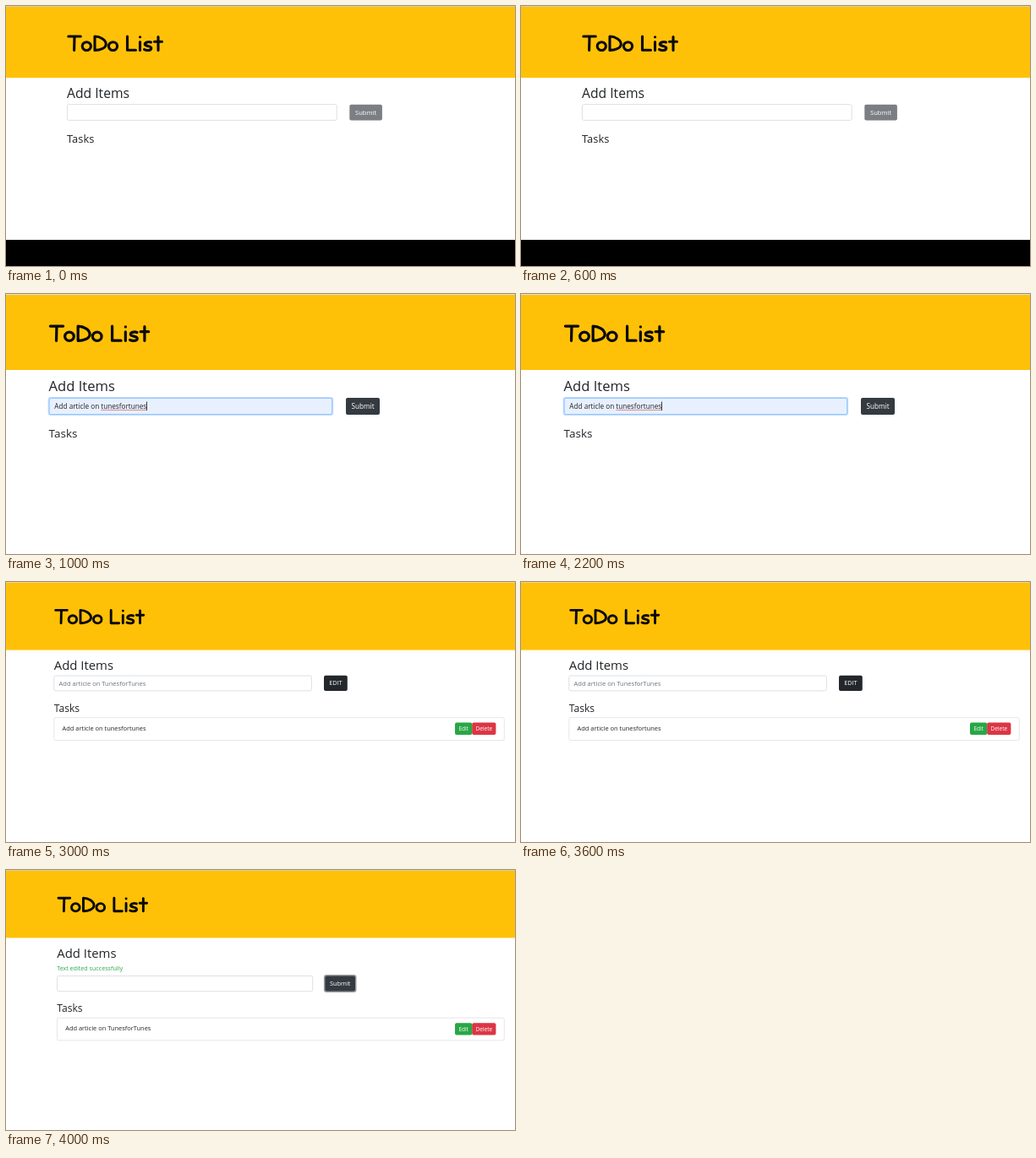
An HTML page that plays this animation: 602x308 px, repeating every 5 s.

```html
<!DOCTYPE html>
<html lang="en">
<head>
<meta charset="utf-8">
<title>ToDo List</title>
<style>
  html, body { margin: 0; width: 100%; height: 100%; overflow: hidden; background: #fff; }
  svg { display: block; width: 602px; height: 308px; font-family: "Open Sans", "Noto Sans", sans-serif; }
  .title path { fill: none; stroke: #0a0a05; stroke-width: 3.1; stroke-linecap: round; stroke-linejoin: round; }
</style>
</head>
<body>
<svg id="stage" viewBox="0 0 602 308"></svg>
<script>
const LOOP = 5000;
const INK = '#212529', DARK = '#343a40', GREEN = '#28a745', RED = '#dc3545';

const rect = (x, y, w, h, fill, extra = '') =>
  `<rect x="${x}" y="${y}" width="${w}" height="${h}" fill="${fill}" ${extra}/>`;
const text = (x, y, size, str, fill = INK, extra = '') =>
  `<text x="${x}" y="${y}" font-size="${size}" fill="${fill}" ${extra}>${str}</text>`;
const heading = (x, y, size, str) => text(x, y, size, str, INK, 'font-weight="500"');
const box = (x, y, w, h, stroke = '#d5d9dd', fill = '#fff') =>
  rect(x, y, w, h, fill, `rx="2" stroke="${stroke}" stroke-width=".8"`);
const button = (x, y, w, h, fill, size, label) =>
  rect(x, y, w, h, fill, 'rx="2"') +
  text(x + w / 2, y + h / 2 + size * .36, size, label, '#fff', 'text-anchor="middle"');

// Hand-lettered title, baseline at y = 0
const lettering = [
  'M1.8-18H16.3M9-18L8.6-1.6',
  'M28.4-6.4A5.1 4.9 0 1 1 18.2-6.4A5.1 4.9 0 1 1 28.4-6.4',
  'M33-18V-1.6C39-1.6 46-4 46.3-8.5C46.5-14 39-18 33-18',
  'M59.6-6.4A5.1 4.9 0 1 1 49.4-6.4A5.1 4.9 0 1 1 59.6-6.4',
  'M71.5-18V-1.7H81.5',
  'M86.5-11.5V-1.6M86.5-17.2h.1',
  'M99.5-11C96-12.5 92-10.5 92.3-8.5C93-6 100-7 99.8-4C99.5-1 94-1 91.5-2.5',
  'M108-17.5V-1.6M103.5-11.7H112.5'
].join('');

const header = (x, baseline, height, scale, edge) =>
  rect(0, 0, 602, height, '#ffc107') + rect(0, 0, 602, 1, edge) +
  `<g class="title" transform="translate(${x} ${baseline}) scale(${scale})">
    <text font-size="24" fill="none">ToDo List</text><path d="${lettering}"/></g>`;

const taskCard = (x, y, h, item) =>
  box(x, y, 589.3 - x, h, '#e0e0e0') +
  text(x + 9.8, y + 15, 7.45, item) +
  button(531, y + 6, 20.3, 14.4, GREEN, 6.5, 'Edit') +
  button(551.2, y + 6, 28.2, 14.4, RED, 6.5, 'Delete');

const squiggle = (x, y, count) =>
  `<path d="M${x} ${y}${'l1 -1l1 1'.repeat(count)}" fill="none" stroke="#e0404a" stroke-width=".7"/>`;

const scenes = [
  { start: 0, art:
    header(72, 54, 85, 1, '#d9cfae') +
    heading(72, 109.2, 15.7, 'Add Items') +
    box(72.4, 116.6, 318.8, 18.8) +
    button(406.3, 116.7, 38.6, 18.8, '#7b7f83', 7.6, 'Submit') +
    heading(72, 161.6, 12.9, 'Tasks') +
    rect(0, 277, 602, 31, '#000') },
  { start: 1000, art:
    header(50.5, 57, 90, 1.05, '#dfdfe4') +
    heading(50.6, 115.2, 16.6, 'Add Items') +
    rect(49.6, 121.9, 337.6, 22.2, '#bfdeff', 'rx="3"') +
    box(51.2, 123.4, 334.4, 19.2, '#80bdff', '#e8f0fe') +
    text(57.3, 136, 8.2, 'Add article on tunesfortunes') +
    squiggle(112.4, 138, 27) +
    rect(166.2, 127.5, .8, 10.5, '#111') +
    button(402, 123, 40, 20, DARK, 8.2, 'Submit') +
    heading(50.6, 170.3, 13.5, 'Tasks') },
  { start: 3000, art:
    header(57, 50.3, 80.6, .94, '#ecd48a') +
    heading(56.8, 103.6, 14.9, 'Add Items') +
    box(56.8, 111, 304.6, 17.8) +
    text(62.6, 122.6, 7.55, 'Add article on TunesforTunes', '#6c757d') +
    button(376, 110.7, 27.8, 18.2, '#23272b', 7.3, 'EDIT') +
    heading(56.8, 153.8, 12.1, 'Tasks') +
    taskCard(56.8, 160.6, 27, 'Add article on tunesfortunes') },
  { start: 4000, art:
    header(60.3, 50.3, 80.4, .945, '#d9cfae') +
    heading(60.3, 103.6, 14.9, 'Add Items') +
    text(60.2, 119, 7.15, 'Text edited successfully', GREEN) +
    box(60.5, 125.5, 302.2, 18.2) +
    rect(375.9, 124.1, 38.6, 21, '#999c9f', 'rx="3"') +
    button(377.4, 125.6, 35.6, 18, DARK, 7.4, 'Submit') +
    heading(60.3, 168.2, 12.1, 'Tasks') +
    taskCard(60.4, 175.2, 26.6, 'Add article on TunesforTunes') }
];

const stage = document.getElementById('stage');
stage.innerHTML = scenes.map(s => `<g>${s.art}</g>`).join('');
const groups = [...stage.children];

function draw() {
  const t = performance.now() % LOOP;
  const current = scenes.findLastIndex(s => t >= s.start);
  groups.forEach((g, i) => g.style.display = i === current ? '' : 'none');
  requestAnimationFrame(draw);
}
draw();
</script>
</body>
</html>
```
